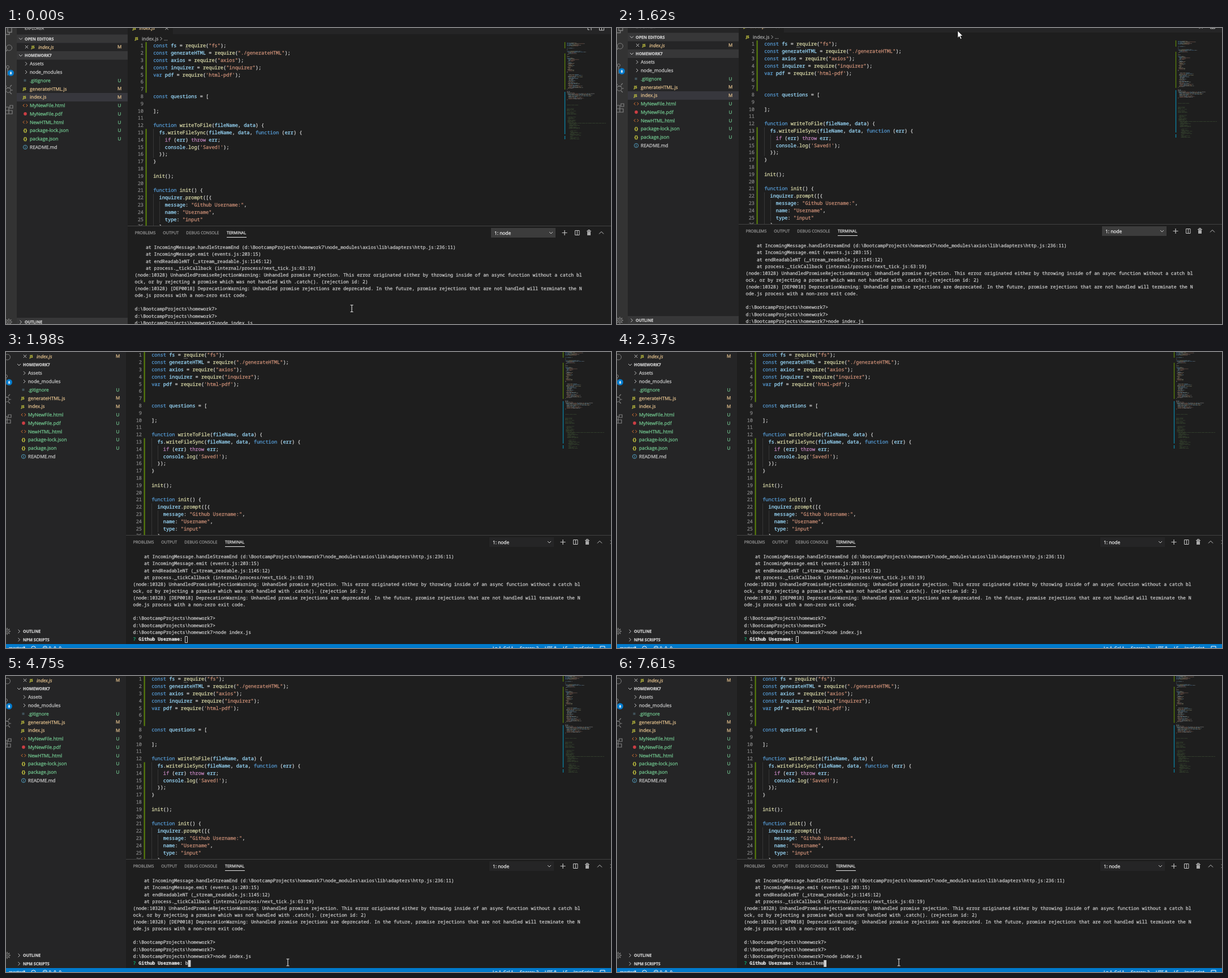
An HTML page with a canvas that plays this animation: 1069x524 px, repeating every 8000 ms.

```html
<!DOCTYPE html>
<html lang="en">
<head>
<meta charset="utf-8">
<title>Editor session</title>
<style>
html, body { margin: 0; width: 100%; height: 100%; overflow: hidden; background: #1e1e1e; }
canvas { display: block; }
</style>
</head>
<body>
<canvas id="stage" width="1069" height="524"></canvas>
<script>
const LOOP = 8000;
const MONO = '"Noto Sans Mono", "DejaVu Sans Mono", monospace';
const UI = '"Open Sans", "Noto Sans", sans-serif';
const EDITOR = { x: 260.2, y: 31.4, row: 12.8, size: 8.6, cell: 5.16 };
const TERM = { x: 227.6, y: 388.4, row: 12.12, size: 8.08, cell: 4.85 };
const YELLOW = '#cbcb41', MODIFIED = '#e2c08d', UNTRACKED = '#73c991', PLAIN = '#cccccc';
const ADDED = '#587c0c', CHANGED = '#0c7d9d', SIDEBAR = '#252526';

// Backgrounds lose their contrast once the view has scrolled
const VIVID = { activity: '#333333', section: '#373738', selected: '#37373d', dropdown: '#3c3c3c' };
const FLAT = { activity: SIDEBAR, section: SIDEBAR, selected: SIDEBAR, dropdown: SIDEBAR };

const code = `const fs = require("fs");
const generateHTML = require("./generateHTML");
const axios = require("axios");
const inquirer = require("inquirer");
var pdf = require('html-pdf');


const questions = [

];

function writeToFile(fileName, data) {
  fs.writeFileSync(fileName, data, function (err) {
    if (err) throw err;
    console.log('Saved!');
  });
}

init();

function init() {
  inquirer.prompt([{
    message: "Github Username:",
    name: "Username",
    type: "input"
  },`.split('\n');

const output = String.raw`    at IncomingMessage.handleStreamEnd (d:\BootcampProjects\homework7\node_modules\axios\lib\adapters\http.js:236:11)
    at IncomingMessage.emit (events.js:203:15)
    at endReadableNT (_stream_readable.js:1145:12)
    at process._tickCallback (internal/process/next_tick.js:63:19)
(node:10328) UnhandledPromiseRejectionWarning: Unhandled promise rejection. This error originated either by throwing inside of an async function without a catch bl
ock, or by rejecting a promise which was not handled with .catch(). (rejection id: 2)
(node:10328) [DEP0018] DeprecationWarning: Unhandled promise rejections are deprecated. In the future, promise rejections that are not handled will terminate the N
ode.js process with a non-zero exit code.

d:\BootcampProjects\homework7>
d:\BootcampProjects\homework7>
d:\BootcampProjects\homework7>node index.js`.split('\n');

const stage = document.getElementById('stage').getContext('2d', { alpha: false });
let pen = stage;

function box(x, y, w, h, color) {
  pen.fillStyle = color;
  pen.fillRect(x, y, w, h);
}

function line(d, color, width = 1) {
  pen.strokeStyle = color;
  pen.lineWidth = width;
  pen.stroke(new Path2D(d));
}

function disc(x, y, r, color, outlined) {
  pen.beginPath();
  pen.arc(x, y, r, 0, 7);
  pen.lineWidth = 1;
  pen.fillStyle = pen.strokeStyle = color;
  outlined ? pen.stroke() : pen.fill();
}

// y is the middle of the capital letters; the hairline stroke keeps small type bright
function text(str, x, y, color, size = 8.35, style = '', family = UI, align = 'left') {
  pen.font = `${style} ${size}px ${family}`;
  pen.textRendering = 'geometricPrecision';
  pen.textAlign = align;
  pen.fillStyle = pen.strokeStyle = color;
  pen.lineWidth = 0.25;
  pen.fillText(str, x, y + size * 0.36);
  pen.strokeText(str, x, y + size * 0.36);
}

const small = (str, x, y, color, style) => text(str, x, y, color, 7.1, style);
const jsIcon = (x, y) => text('JS', x, y, YELLOW, 6.4, 'bold');
const chevron = (x, y, dir, color = '#c5c5c5') => line({
  down: `M${x - 3} ${y - 1.5}l3 3l3 -3`,
  up: `M${x - 4} ${y + 2}l4 -4l4 4`,
  right: `M${x - 1.5} ${y - 3}l3 3l-3 3`
}[dir], color);
const cross = (x, y, r, color) => line(`M${x - r} ${y - r}l${2 * r} ${2 * r}m0 ${-2 * r}l${-2 * r} ${2 * r}`, color);

function tokens(str) {
  const rule = /("[^"]*"|'[^']*')|\b(const|var|function)\b|\b(if|throw)\b|(\w+)(?=\()|(\w+)|[^\w\s"']+/g;
  const colors = ['#ce9178', '#569cd6', '#c586c0', '#dcdcaa', '#9cdcfe'];
  return [...str.matchAll(rule)].map(m => ({
    str: m[0], col: m.index, color: colors[m.slice(1).findIndex(Boolean)] || '#d4d4d4'
  }));
}

function drawActivityBar(shades) {
  const gray = '#808080';
  box(0, 0, 19, 560, shades.activity);
  line('M3 -5V7.500H10V-3M-1 2V11.500H6V8', gray, 1.3);
  disc(5.5, 35, 5, gray, true);
  line('M2 39L-2 43', gray, 1.4);
  disc(3, 69, 2.5, gray, true);
  line('M3 72V84M3 79Q8 79 8 74', gray, 1.2);
  disc(8.5, 79.5, 5.5, '#007acc');
  text('8', 8.5, 79.5, '#fff', 6.3, 'bold', UI, 'center');
  disc(4, 110, 4.3, gray, true);
  line('M1 104L-1 101M7 104L10 101M8 110H12M7 114L10 117M1 106H8', gray, 1.2);
  line('M-1 140H5V152H-1M-1 146H11V152H5M7 137H12V142H7Z', gray, 1.2);
  disc(5, 520.5, 3.6, gray, true);
  disc(5, 520.5, 1.4, gray, true);
  for (let i = 0; i < 8; i++) {
    const c = Math.cos(i * Math.PI / 4), s = Math.sin(i * Math.PI / 4);
    line(`M${5 + 4 * c} ${520.5 + 4 * s}l${2 * c} ${2 * s}`, gray, 1.6);
  }
}

function drawSidebar(shades) {
  box(19, 0, 196, 560, SIDEBAR);
  small('EXPLORER', 33, 0, '#bbbbbb');
  const section = (name, y, dir) => {
    box(19, y - 7.5, 196, 15, shades.section);
    chevron(26, y, dir);
    small(name, 33, y, '#d0d0d0', 'bold');
  };
  section('OPEN EDITORS', 19, 'down');
  section('HOMEWORK7', 48.5, 'down');
  section('OUTLINE', 520.5, 'right');
  section('NPM SCRIPTS', 535.3, 'right');

  const status = (letter, y, color) => text(letter, 200.5, y, color, 8, '', UI, 'center');
  cross(36.5, 33.5, 2.6, '#c5c5c5');
  jsIcon(45, 33.5);
  text('index.js', 57, 33.5, MODIFIED, 8.35, 'italic');
  status('M', 33.5, MODIFIED);

  const icons = {
    folder: y => chevron(35.5, y, 'right'),
    js: y => jsIcon(30, y),
    git: y => box(31.5, y - 2, 4, 4, '#41535b'),
    html: y => line(`M32.500 ${y - 2.5}l-2.500 2.500l2.500 2.500m3 -5l2.500 2.500l-2.500 2.500`, '#e37933'),
    pdf: y => disc(34, y, 2.8, '#cc3e44'),
    json: y => text('{}', 34, y, YELLOW, 8, 'bold', UI, 'center'),
    info: y => {
      disc(34, y, 3.6, '#519aba', true);
      line(`M34 ${y - 2.2}v1M34 ${y - 0.5}v2.600`, '#519aba');
    }
  };
  const files = [
    ['Assets', 'folder'], ['node_modules', 'folder'], ['.gitignore', 'git', 'U'],
    ['generateHTML.js', 'js', 'M'], ['index.js', 'js', 'M'], ['MyNewFile.html', 'html', 'U'],
    ['MyNewFile.pdf', 'pdf', 'U'], ['NewHTML.html', 'html', 'U'], ['package-lock.json', 'json', 'U'],
    ['package.json', 'json', 'U'], ['README.md', 'info']
  ];
  box(19, 115, 196, 15, shades.selected);
  files.forEach(([name, icon, state], i) => {
    const y = 63.3 + 14.77 * i;
    const color = { U: UNTRACKED, M: MODIFIED }[state] || PLAIN;
    icons[icon](y);
    text(name, 42, y, color);
    if (state) status(state, y, color);
  });
}

function drawEditor() {
  const { x, y, row, size, cell } = EDITOR;
  box(295, 0, 785, 11, SIDEBAR);
  jsIcon(224, 0.3);
  text('index.js', 235.5, 0.3, MODIFIED, 8.35, 'italic');
  cross(284, 0.3, 2.6, '#c5c5c5');
  line('M1028 -2V3H1031M1034 4V-1H1031', '#c5c5c5');
  line('M1048.500 -4V4H1056.500V-4M1052.500 -4V4', '#c5c5c5');
  jsIcon(228, 19);
  text('index.js', 240, 19, '#a9a9a9');
  chevron(274, 19, 'right', '#a9a9a9');
  text('...', 279, 19, '#a9a9a9');

  pen.save();
  pen.beginPath();
  pen.rect(215, 25, 865, 325);
  pen.clip();
  const gutter = (from, to) => box(246.5, y + row * (from - 1.5), 2.2, row * (to - from + 1), ADDED);
  gutter(1, 7);
  gutter(13, 26);
  const guide = (col, from, to) =>
    box(Math.round(x + col * cell), y + row * (from - 1.5), 1, row * (to - from + 1), '#363636');
  guide(0, 13, 16);
  guide(2, 14, 15);
  guide(0, 22, 26);
  guide(2, 23, 25);
  code.forEach((str, i) => {
    const mid = y + row * i;
    text(i + 1, 243, mid, '#858585', size, '', MONO, 'right');
    for (const t of tokens(str)) text(t.str, x + t.col * cell, mid, t.color, size, '', MONO);
  });
  for (let i = 0; i < 3; i++) box(317.5 + 2.5 * i, 36.5, 1.2, 1.2, '#a0a0a0');
  pen.restore();
}

function drawMinimap() {
  const left = 991, top = 26, row = 1.34, cell = 0.67;
  const noise = n => Math.abs(Math.sin(n * 12.9898) * 43758.5453) % 1;
  const mark = (i, col, len, color) => box(left + col * cell, top + i * row, len * cell, 0.8, color);
  pen.globalAlpha = 0.42;
  code.forEach((str, i) => tokens(str).forEach(t => mark(i, t.col, t.str.length, t.color)));
  // first row, last row, indent, longest length, comment
  const blocks = [
    [26, 37, 2, 18], [38, 39, 0, 5], [42, 60, 3, 46], [61, 61, 0, 2], [64, 66, 0, 30], [67, 70, 2, 88],
    [71, 74, 2, 44], [75, 75, 0, 2], [82, 82, 0, 30, 1], [87, 90, 0, 28, 1], [92, 94, 0, 30, 1],
    [98, 105, 2, 24, 1], [106, 106, 5, 98, 1], [107, 113, 5, 30, 1], [116, 127, 8, 30, 1]
  ];
  const palette = ['#9cdcfe', '#d4d4d4', '#ce9178', '#dcdcaa'];
  for (const [from, to, indent, longest, comment] of blocks) {
    pen.globalAlpha = comment ? 0.3 : 0.42;
    for (let i = from; i <= to; i++) {
      const end = indent + longest * (from === to ? 1 : 0.2 + 0.8 * noise(i));
      let col = indent + 2 * Math.floor(noise(i + 0.5) * (indent ? 2 : 1));
      for (let n = 0; col < end; n++) {
        const len = Math.min(3 + 8 * noise(i + n * 7.3), end - col);
        mark(i, col, len, comment ? '#6a9955' : palette[Math.floor(4 * noise(i * 3 + n))]);
        col += len + 1.2;
      }
    }
  }
  pen.globalAlpha = 1;
  box(986.8, 25, 1.4, 11, ADDED);
  box(986.8, 45, 1.4, 64, ADDED);
  box(986.8, 113, 1.4, 75, CHANGED);
  box(986.8, 191, 1.4, 6, CHANGED);
}

function drawPanel(shades) {
  box(215, 350, 865, 1, '#424242');
  const y = 362.5, gray = '#949494', icon = '#c5c5c5';
  small('PROBLEMS', 227.7, y, gray);
  small('OUTPUT', 277.3, y, gray);
  small('DEBUG CONSOLE', 318.3, y, gray);
  small('TERMINAL', 390, y, '#e7e7e7');
  box(390, 370, 35, 1, '#e7e7e7');
  box(857, 354, 114, 17, shades.dropdown);
  text('1: node', 863, y, '#f0f0f0');
  chevron(963, y, 'down');
  line(`M982.500 ${y}H991.500M987 ${y - 4.5}v9`, icon, 1.2);
  line('M1005.500 358.500h7.500v8h-7.500zM1009.300 358.500v8', icon);
  line('M1026 359.500h8M1028.500 359v-1.500h3v1.500', icon);
  box(1027, 360.5, 6, 6.5, '#aaaaaa');
  chevron(1052, y, 'up');
  cross(1074, y, 3, icon);

  const print = (str, col, i, color = PLAIN, style = '') =>
    text(str, TERM.x + col * TERM.cell, TERM.y + i * TERM.row, color, TERM.size, style, MONO);
  output.forEach((str, i) => print(str.trimStart(), str.length - str.trimStart().length, i));
  print('?', 0, 12, '#0dbc79');
  print('Github Username:', 2, 12, '#e5e5e5', 'bold');
}

function drawStatusBar() {
  const y = 550.5, white = '#ffffff';
  const label = (str, x) => text(str, x, y, white, 7.65);
  box(0, 543, 1080, 17, '#007acc');
  label('master*', 8);
  disc(51.5, y, 3.7, white, true);
  disc(72, y, 3.7, white, true);
  cross(72, y, 1.7, white);
  label('0', 78.5);
  line(`M89.500 ${y - 3.5}l4 7h-8z`, white);
  label('0', 96.5);
  label('Ln 1, Col 1', 863);
  label('Spaces: 2', 911);
  label('UTF-8', 955);
  label('LF', 987);
  label('JavaScript', 1006);
  line(`M1053 ${y - 3.5}h8v6h-4l-2 2v-2h-2z`, white);
}

function buildScene(shades) {
  const canvas = document.createElement('canvas');
  canvas.width = 1080;
  canvas.height = 560;
  pen = canvas.getContext('2d', { alpha: false });
  box(0, 0, 1080, 560, '#1e1e1e');
  drawActivityBar(shades);
  drawSidebar(shades);
  drawEditor();
  drawMinimap();
  drawPanel(shades);
  drawStatusBar();
  return canvas;
}

const vividScene = buildScene(VIVID), flatScene = buildScene(FLAT);
const views = [[0, 0, 0, vividScene], [1620, 0, -3, vividScene], [1740, -3, -26, flatScene]];
const pointer = [
  [0, 611, 496.5, 'beam'], [500, 565, 138.5, 'beam'], [780, 604.5, 11, 'arrow'],
  [930, 600, 4, 'arrow'], [1050, 596, 0, 'arrow'], [1170, 594, 0, 'arrow'],
  [1290, 597, 2, 'arrow'], [1410, 601, 6, 'arrow'], [1620, 602, 5, 'arrow'], [1740],
  [2590, 598, 3.5, 'beam'], [2840, 566, 170, 'beam'], [2970, 518, 442.5, 'beam'],
  [3120, 506, 488, 'beam'], [3240, 498.5, 510, 'beam'], [3530, 497, 510, 'beam'], [3670, 498, 507, 'beam']
];
const carets = [[0, 'outline'], [3790, 'block'], [3910, 'lineEnd'], [4750, 'block']];
const username = 'borawiltem';
const keyTimes = [4750, 5150, 5270, 5420, 5700, 6510, 6630, 6910, 7050, 7610];

const at = (steps, t) => steps.findLast(step => step[0] <= t);

const pointers = {
  beam(x, y) {
    const d = `M${x - 2.5} ${y - 6}h2l.500 .500l.500 -.500h2M${x} ${y - 6}v12M${x - 2.5} ${y + 6}h2l.500 -.500l.500 .500h2`;
    line(d, '#e4e4e4', 1.1);
  },
  arrow(x, y) {
    const shape = new Path2D(`M${x} ${y}v12.500l2.900 -2.700l2.100 4.900l2 -.900l-2.100 -4.700h4z`);
    pen.fillStyle = '#ffffff';
    pen.fill(shape);
    pen.lineWidth = 0.6;
    pen.strokeStyle = '#000000';
    pen.stroke(shape);
  }
};

function drawInput(t) {
  const typed = keyTimes.filter(time => time <= t).length;
  const start = TERM.x + 19 * TERM.cell, top = 529;
  text(username.slice(0, typed), start, TERM.y + 12 * TERM.row, PLAIN, TERM.size, '', MONO);
  const caret = at(carets, t)[1];
  const x = start + typed * TERM.cell;
  if (caret === 'outline') {
    line(`M${Math.round(x) - 0.5} ${top + 0.5}h4v11h-4z`, PLAIN);
  } else {
    box(caret === 'lineEnd' ? TERM.x + 162 * TERM.cell : x, top, TERM.cell, 12, PLAIN);
  }
}

function frame() {
  const t = performance.now() % LOOP;
  const [, dx, dy, scene] = at(views, t);
  const [, x, y, kind] = at(pointer, t);
  pen = stage;
  pen.save();
  pen.translate(dx, dy);
  pen.drawImage(scene, 0, 0);
  drawInput(t);
  pen.restore();
  if (kind) pointers[kind](x, y);
  requestAnimationFrame(frame);
}
frame();
</script>
</body>
</html>
```
